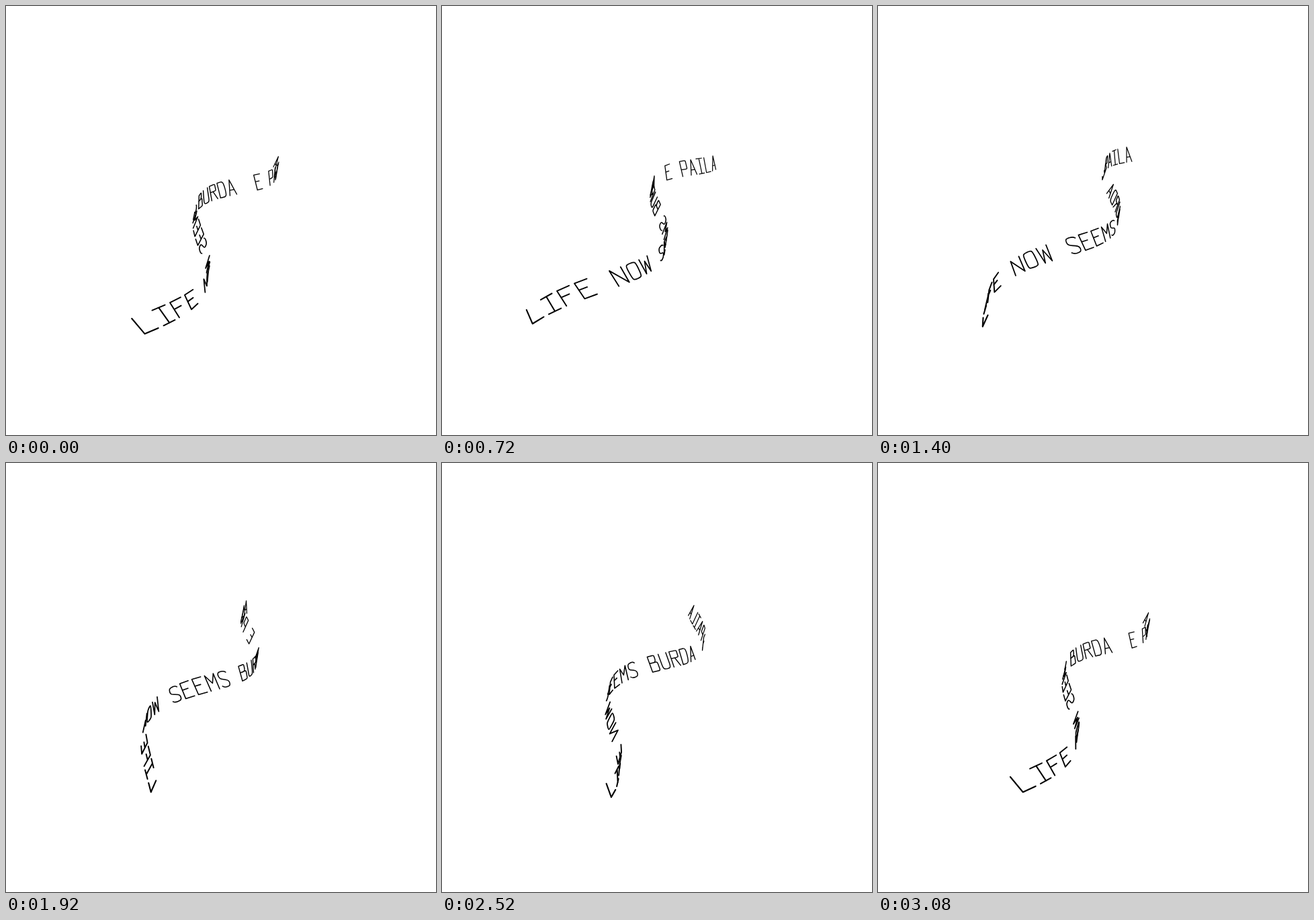
An HTML page with a canvas that plays this animation: 640x638 px, repeating every 3120 ms.

```html
<!DOCTYPE html>
<html lang="en">
<head>
<meta charset="utf-8">
<title>Spiral text</title>
<style>
html, body { margin: 0; width: 100%; height: 100%; overflow: hidden; background: #fff; }
canvas { display: block; }
</style>
</head>
<body>
<canvas id="stage" width="640" height="638" role="img" aria-label="LIFE NOW SEEMS BURDA E PAILA"></canvas>
<script>
const TEXT = 'LIFE NOW SEEMS BURDA  E PAILA';
const LOOP = 3120, STEP = 40;
const TURN = LOOP + STEP;     // a full turn takes one step more than the loop shows
const LETTER_DELAY = 150.5;   // ms by which each letter trails the one before
const CAP_LEAD = 120;         // ms by which the cap line runs ahead of the baseline
const LETTER_WIDTH = 0.7;     // share of the letter pitch
const TAU = 2 * Math.PI;

// Strokes on a grid 6 wide and 9 high, as "xy" pairs; "~" marks a rounded stroke.
const GLYPHS = {
  A: '00 39 60|13 53',
  B: '00 09|~09 39 59 58 56 45 35 05|~05 45 65 63 62 60 40 00',
  D: '00 09|~09 29 59 67 62 50 20 00',
  E: '69 09 00 60|05 45',
  F: '69 09 00|05 45',
  I: '09 69|39 30|00 60',
  L: '09 00 60',
  M: '00 09 34 69 60',
  N: '00 09 60 69',
  O: '~39 59 68 61 50 10 01 08 19 39',
  P: '00 09|~09 39 69 68 65 64 34 04',
  R: '00 09|~09 39 69 68 66 65 35 05|35 60',
  S: '~68 59 19 08 06 15 44 63 61 50 10 01',
  U: '~09 04 01 10 50 61 64 69',
  W: '09 10 37 50 69'
};

const ctx = document.getElementById('stage').getContext('2d');
ctx.lineCap = ctx.lineJoin = 'round';

const depthScale = u => 1 / (1 + 0.0455 * u);

// u runs along the text in letters, v from baseline (0) to cap height (1).
function project(u, v, time) {
  const s = depthScale(u);
  const far = 1 - s;
  const angle = TAU * (time - 2500 - LETTER_DELAY * u + CAP_LEAD * v) / TURN;
  const swing = 61 * s * Math.cos(angle);
  return [
    191 + far * (288 + 92 * far) + v * (12 * far - 5) + swing,
    484.3 - far * (360 + 146 * far) - 19.8 * v + (0.21 + 0.33 * far) * swing
  ];
}

function trace(points, rounded) {
  ctx.moveTo(...points[0]);
  const last = points.length - 1;
  for (let i = 1; i <= last; i++) {
    const [x, y] = points[i];
    if (!rounded) {
      ctx.lineTo(x, y);
    } else if (i < last) {
      const [nx, ny] = points[i + 1];
      const end = i === last - 1 ? [nx, ny] : [(x + nx) / 2, (y + ny) / 2];
      ctx.quadraticCurveTo(x, y, ...end);
    }
  }
}

function drawLetter(char, index, time) {
  ctx.lineWidth = 0.5 + 1.6 * depthScale(index);
  ctx.beginPath();
  for (const stroke of GLYPHS[char].split('|')) {
    const points = stroke.match(/\d\d/g).map(([x, y]) =>
      project(index + x / 6 * LETTER_WIDTH, y / 9, time));
    trace(points, stroke[0] === '~');
  }
  ctx.stroke();
}

const start = performance.now();

function frame() {
  const elapsed = performance.now() - start;
  const time = Math.floor(elapsed % LOOP / STEP) * STEP;
  ctx.fillStyle = '#fff';
  ctx.fillRect(0, 0, 640, 638);
  ctx.strokeStyle = '#000';
  // The first step of the loop is already one full turn in.
  [...TEXT].forEach((char, i) => {
    if (char !== ' ') drawLetter(char, i, time + TURN);
  });
  requestAnimationFrame(frame);
}
frame();
</script>
</body>
</html>
```
